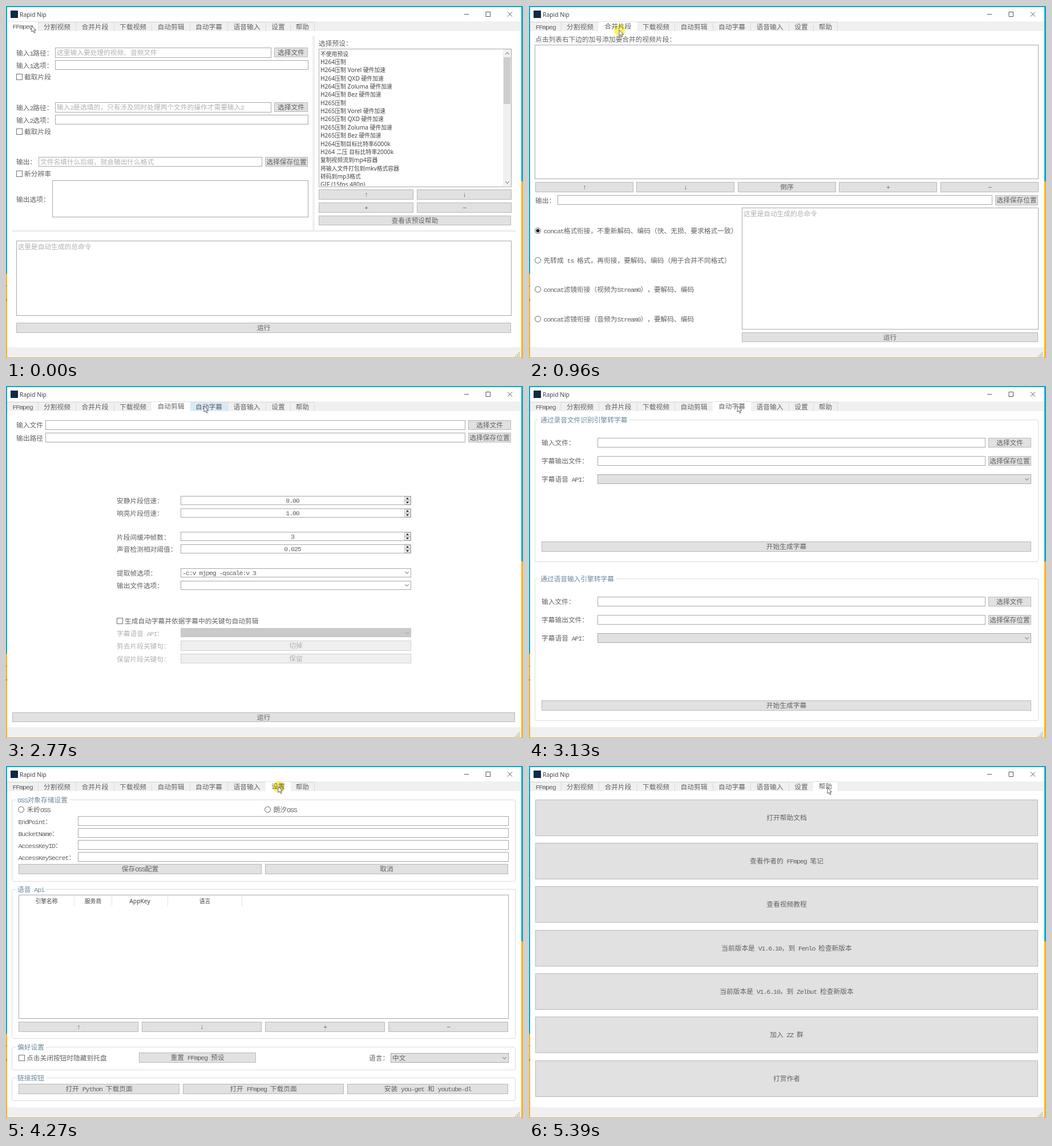
These frames come from a looping animation (906x618 px, 5570 ms). An HTML page:

```html
<!DOCTYPE html>
<html lang="zh-CN">
<head>
<meta charset="utf-8">
<title>Rapid Nip</title>
<style>
html, body { margin: 0; width: 100%; height: 100%; overflow: hidden; background: #fff; }
#stage {
  position: relative; width: 906px; height: 618px; overflow: hidden; background: #fff;
  font: 300 11.73px "Noto Sans CJK SC", "Noto Sans CJK", sans-serif; color: #626262;
  white-space: pre; text-spacing-trim: space-all; font-kerning: none;
}
#stage div, #stage svg { position: absolute; box-sizing: border-box; }
i { font: 1em/1 "Liberation Mono", monospace; letter-spacing: -.1em; }
.lb { line-height: 20px; }
.sans { font-size: 9.8px; color: #444; }
.sans i { font: 1.05em/1 "Noto Sans", sans-serif; letter-spacing: 0; }
.big { font-size: 13.03px; }
.ph { color: #b0b0b0; }
.off { color: #b0b0b0; }
.mid, .bt { text-align: center; }
.in { border: 1px solid #a8a8a8; background: #fff; padding-left: 2px; }
.in.mid { padding: 0; }
.ar { border: 1px solid #a6a8ab; background: #fff; }
.bt { border: 1px solid #b8b8b8; background: #e1e1e1; }
.bt.off { border-color: #d0d0d0; background: #efefef; }
.gray { background: #e1e1e1; }
.dark { background: #cacaca; border-color: #c4c4c4; }
.gr { border: 1px solid #dcdcdc; border-radius: 3px; }
.gt { background: #fff; padding: 0 3px; color: #6a899c; line-height: 14px; }
.ck { border: 1px solid #707070; background: #fff; }
.rd { border: 1px solid #606060; border-radius: 50%; background: #fff; }
.rd.on { background: radial-gradient(#222 0 2.8px, #fff 3.4px); }
.rd.dim { border-color: #c4c4c4; }
.cv { border: solid #808080; border-width: 0 1px 1px 0; transform: rotate(45deg); }
.cv.up { transform: rotate(225deg); }
.cv.dim { border-color: #aaa; }
.sp { border: 1px solid #c4c4c4; background: #f0f0f0; }
.tri { border: solid transparent; border-width: 0 2.5px 3px; border-bottom-color: #333; }
.tri.dn { transform: scaleY(-1); }
.bar { background: #f0f0f0; }
.tab { border: solid #dadada; border-width: 1px 1px 0 0; background: #f0f0f0; text-align: center; }
.tab.hover { background: #d8eaf8; }
.tab.on { background: #fff; border-color: #e2e2e2; }
.clip { overflow: hidden; }
.page { left: 0; top: 0; width: 906px; height: 618px; visibility: hidden; }
#spot { width: 20px; height: 20px; border-radius: 50%; background: #fff04a; opacity: .85; mix-blend-mode: multiply; }
</style>
</head>
<body>
<div id="stage"></div>
<script>
// Half-width runs get their own face
const rich = s => s.replace(/[\x20-\x7e↑↓−]+/g, m => `<i>${m}</i>`);
const raw = (x1, y1, x2, y2, cls, html = '', css = '') =>
  `<div class="${cls}" style="left:${x1}px;top:${y1}px;width:${x2 - x1}px;height:${y2 - y1}px;${css}">${html}</div>`;
const box = (x1, y1, x2, y2, cls, s = '') =>
  raw(x1, y1, x2, y2, cls, rich(s), `line-height:${y2 - y1 - 4}px`);
const label = (x, y, s, cls = '') =>
  `<div class="lb ${cls}" style="left:${x}px;top:${y - 10.5}px">${rich(s)}</div>`;
const labels = (x, ys, names) => names.map((s, i) => label(x, ys[i], s)).join('');
const button = (x1, y1, x2, y2, s, cls = '') => box(x1, y1, x2, y2, 'bt ' + cls, s);
const field = (x1, y1, x2, y2, s = '', cls = '') => box(x1, y1, x2, y2 + 1, 'in ' + cls, s);
const area = (x1, y1, x2, y2) => raw(x1, y1, x2, y2 + 1, 'ar');
const chevron = (x, y, cls = '') => raw(x - 2.5, y - 3.5, x + 2.5, y + 1.5, 'cv ' + cls);
const combo = (x1, y1, x2, y2, s = '', cls = '') =>
  field(x1, y1, x2, y2, s, cls) + chevron(x2 - 8, (y1 + y2) / 2);
const check = (x, y, s) => raw(x, y - 5, x + 11, y + 6, 'ck') + label(x + 14.5, y, s);
const radio = (x, y, s, cls = '') =>
  raw(x - 5.5, y - 5.5, x + 5.5, y + 5.5, 'rd ' + cls) + label(x + 10, y, s, cls === 'dim' ? 'off' : '');
const group = (y1, y2, s) => raw(10, y1, 893, y2, 'gr') +
  `<div class="gt" style="left:17px;top:${y1 - 7}px">${rich(s)}</div>`;
const spin = (y, s) => field(306, y, 710, y + 15) + box(306, y, 698, y + 17, 'mid', s) +
  raw(698, y + 1, 709, y + 8, 'sp') + raw(698, y + 8, 709, y + 15, 'sp') +
  raw(701, y + 3, 706, y + 6, 'tri') + raw(701, y + 10, 706, y + 13, 'tri dn');
const row = (xs, w, y, names) => names.map((s, i) => button(xs[i], y, xs[i] + w, y + 18, s)).join('');

const pick = '选择文件', save = '选择保存位置', run = '运行', total = '这里是自动生成的总命令';
const home = "C:/Users/m'li's";

function mainPage() {
  const presets = ['不使用预设'];
  for (const codec of ['H264', 'H265'])
    for (const hw of ['', ' Vorel 硬件加速', ' QXD 硬件加速', ' Zoluma 硬件加速', ' Bez 硬件加速'])
      presets.push(codec + '压制' + hw);
  presets.push('H264压制目标比特率6000k', 'H264 二压 目标比特率2000k', '复制视频流到mp4容器',
    '将输入文件打包到mkv格式容器', '转码到mp3格式', 'GIF (15fps 480p)');
  const input = (n, y, hint) => label(18, y, `输入${n}路径：`) + field(86, y - 9, 465, y + 8, hint, 'ph') +
    button(470, y - 9, 529, y + 8, pick) + label(18, y + 22, `输入${n}选项：`) +
    field(86, y + 13, 530, y + 29) + check(17.5, y + 42, '截取片段');
  return raw(537, 52, 541, 393, 'bar') + raw(10, 393, 893, 397, 'bar') +
    input(1, 82, '这里输入要处理的视频、音频文件') +
    input(2, 178, '输入2是选填的，只有涉及同时处理两个文件的操作才需要输入2') +
    label(18, 273, '输出：') + field(57, 265, 449, 281, '文件名填什么后缀，就会输出什么格式', 'ph') +
    button(454, 265, 529, 282, save) + check(17.5, 294, '新分辨率') +
    label(18, 339, '输出选项：') + area(81, 306, 530, 370) +
    label(548, 65, '选择预设：') + area(548, 75, 886, 317) +
    raw(549, 76, 871, 316, 'clip', presets.map((s, i) => label(2, 8 + i * 14.37, s, 'sans')).join('')) +
    raw(871, 76, 885, 316, 'bar') + raw(872, 90, 884, 172, '', '', 'background:#cdcdcd') +
    chevron(878, 85, 'up') + chevron(878, 309) +
    row([548, 720], 166, 322, ['↑', '↓']) + row([548, 720], 166, 345, ['+', '−']) +
    button(548, 368, 885, 385, '查看该预设帮助') +
    area(18, 412, 886, 543) + label(20.5, 422, total, 'ph') + button(18, 556, 885, 574, run);
}

function splitPage() {
  const part = (y, h, title, name, value) => group(y, y + h, title) +
    label(22, y + 26, name) + field(120, y + 18, 800, y + 34, value, 'mid') +
    label(22, y + 49, '输出文件夹：') + field(120, y + 41, 800, y + 57) +
    check(22, y + 73, '指定时间段') + label(120, y + 73, '起始时间：') + field(190, y + 65, 440, y + 81) +
    label(460, y + 73, '截止时间：') + field(530, y + 65, 800, y + 81) +
    button(805, y + 18, 880, y + 81, run);
  return label(18, 62, '输入文件：') + field(86, 54, 805, 70) + button(810, 54, 885, 71, pick) +
    part(96, 190, '对字幕中的每一句剪出对应的片段', '输入字幕：', '') +
    label(22, 196, '字幕时间偏移：') + field(120, 188, 440, 204, '0.0', 'mid') +
    check(22, 221, '同时导出分段srt字幕') +
    part(309, 122, '根据指定时长分割片段', '片段时长：', '60') +
    part(454, 134, '根据指定大小分割片段', '片段大小(MB)：', '20');
}

function joinPage() {
  return label(11, 58, '点击列表右下边的加号添加要合并的视频片段：') + area(10, 68, 893, 303) +
    row([11, 188, 366, 543, 721], 172, 309, ['↑', '↓', '倒序', '+', '−']) +
    label(11, 341, '输出：') + field(50, 332, 812, 348) + button(817, 332, 892, 350, save) +
    radio(15.5, 394, 'concat格式衔接，不重新解码、编码（快、无损、要求格式一致）', 'on') +
    radio(15.5, 446, '先转成 ts 格式，再衔接，要解码、编码（用于合并不同格式）') +
    radio(15.5, 497.5, 'concat滤镜衔接（视频为Stream0），要解码、编码') +
    radio(15.5, 549, 'concat滤镜衔接（音频为Stream0），要解码、编码') +
    area(373, 354, 893, 567) + label(376, 364, total, 'ph') + button(373, 573, 892, 590, run);
}

function downloadPage() {
  const best = '不填则默认下载最高画质', blank = '默认不用填';
  const tool = (y, name, proxy) => group(y, y + 165, `使用 ${name} 下载视频`) +
    labels(22, [18, 39, 61, 84, 105].map(d => y + d), ['视频链接：', '保存路径：', '下载格式(流id)：', 'Cookies', '代理：']) +
    field(120, y + 10, 570, y + 26) + check(574.5, y + 18, '下载视频列表') +
    combo(120, y + 31, 800, y + 46, home) +
    field(120, y + 52, 570, y + 68, best, 'ph mid') + button(575, y + 52, 799, y + 69, '列出流id') +
    field(120, y + 75, 570, y + 91, blank, 'ph') + button(575, y + 75, 799, y + 92, pick) +
    combo(120, y + 97, 800, y + 112, proxy) + button(805, y + 11, 880, y + 112, '开始下载视频');
  return tool(59, 'Annie', '') + tool(241, 'You-Get', '--no-proxy') +
    group(424, 589, '使用 Youtube-dl 下载视频') +
    labels(22, [442, 463, 484, 505, 528, 550], ['视频链接：', '保存路径：', '文件命名格式：', '格式id：', 'Cookies', '代理：']) +
    field(108, 434, 566, 450) + check(570.5, 442, '只下载字幕') +
    combo(108, 455, 800, 470, home + '/Videos') +
    field(108, 476, 800, 491, '%(title)s from：%(uploader)s %(resolution)s %(fps)s fps %(id)s.%(ext)s') +
    field(108, 497, 566, 513, best, 'ph mid') + button(571, 497, 799, 514, '列出格式id') +
    field(108, 519, 566, 535, blank, 'ph') + button(571, 519, 799, 537, pick) +
    combo(108, 542, 800, 557) + button(805, 434, 880, 557, '开始下载视频');
}

function cutPage() {
  return labels(18, [68, 91], ['输入文件', '输出路径']) +
    field(69, 60, 805, 76) + button(810, 60, 885, 77, pick) +
    field(69, 82, 805, 98) + button(810, 82, 885, 99, save) +
    labels(194, [201, 223, 265, 286, 328, 350],
      ['安静片段倍速：', '响亮片段倍速：', '片段间缓冲帧数：', '声音检测相对阈值：', '提取帧选项：', '输出文件选项：']) +
    spin(193, '8.00') + spin(215, '1.00') + spin(256, '3') + spin(278, '0.025') +
    combo(306, 320, 710, 335, '-c:v mjpeg -qscale:v 3') + combo(306, 342, 710, 357) +
    check(193.5, 412, '生成自动字幕并依据字幕中的关键句自动剪辑') +
    label(194, 434, '字幕语音 API：', 'off') + field(306, 425, 710, 440, '', 'dark') + chevron(702, 433, 'dim') +
    label(194, 456, '剪去片段关键句：', 'off') + button(306, 447, 710, 465, '切掉', 'off') +
    label(194, 479, '保留片段关键句：', 'off') + button(306, 470, 710, 487, '保留', 'off') +
    button(11, 573, 892, 590, run);
}

function subtitlePage() {
  const engine = (y, title) => group(y, y + 250, title) +
    labels(22, [40, 72, 104].map(d => y + d), ['输入文件：', '字幕输出文件：', '字幕语音 API：']) +
    field(120, y + 32, 800, y + 48) + button(805, y + 32, 880, y + 49, pick) +
    field(120, y + 64, 800, y + 80) + button(805, y + 64, 880, y + 81, save) +
    combo(120, y + 96, 880, y + 112, '', 'gray') +
    button(22, y + 214, 880, y + 232, '开始生成字幕');
  return engine(59, '通过录音文件识别引擎转字幕') + engine(338, '通过语音输入引擎转字幕');
}

function voicePage() {
  return label(11, 60, '字幕语音 API：') + combo(97, 51, 893, 67, '', 'gray') +
    radio(15.5, 99, '停用 CapsWirter 语音输入', 'on') + radio(459, 99, '启用 CapsWirter 语音输入', 'dim') +
    area(10, 130, 893, 275) + area(10, 300, 893, 444) +
    label(13.5, 140.5, '选择禾岭云 api 的引擎，启用 CapsWriter 语音输入后，只要在任意界面长按大写大写锁定键（Caps Lk）超过 0.3 秒，就会开始进行语音识别，说几', 'big') +
    label(13.5, 155, '句话，再松开大写锁定键，请别结果就会自动输入。你可以在这个输入框试试效果', 'big');
}

function settingsPage() {
  const keys = ['EndPoint：', 'BucketName：', 'AccessKeyID：', 'AccessKeySecret：'];
  const head = (x1, x2, s) => box(x1, 228, x2, 250, 'mid sans', s) + raw(x2, 228, x2 + 1, 246, '', '', 'background:#e2e2e2');
  return group(59, 203, 'OSS对象存储设置') + radio(26.5, 76, '禾岭OSS') + radio(458.5, 76, '朗汐OSS') +
    keys.map((s, i) => label(21.5, 97 + i * 21, s) + field(126, 88 + i * 21, 881, 104 + i * 21)).join('') +
    row([22, 454], 426, 172, ['保存OSS配置', '取消']) +
    group(216, 479, '语音 Api') + area(22, 226, 881, 443) +
    head(23, 119, '引擎名称') + head(120, 185, '服务商') + head(186, 283, 'AppKey') + head(284, 413, '语言') +
    row([22, 238, 454, 670], 210, 449, ['↑', '↓', '+', '−']) +
    group(493, 534, '偏好设置') + check(21.5, 512, '点击关闭按钮时隐藏到托盘') +
    button(233, 503, 438, 521, '重置 FFmpeg 预设') + label(636, 512, '语言：') +
    combo(674, 504, 881, 520, '中文', 'gray') +
    group(547, 588, '链接按钮') +
    row([22, 310, 598], 282, 558, ['打开 Python 下载页面', '打开 FFmpeg 下载页面', '安装 you-get 和 youtube-dl']);
}

function helpPage() {
  return ['打开帮助文档', '查看作者的 FFmpeg 笔记', '查看视频教程', '当前版本是 V1.6.10，到 Fenlo 检查新版本',
    '当前版本是 V1.6.10，到 Zelbut 检查新版本', '加入 ZZ 群', '打赏作者']
    .map((s, i) => { const y = Math.round(58.7 + i * 76.35); return button(11, y, 892, y + 64, s); }).join('');
}

const pages = [mainPage, splitPage, joinPage, downloadPage, cutPage, subtitlePage, voicePage, settingsPage, helpPage];
const names = ['FFmpeg', '分割视频', '合并片段', '下载视频', '自动剪辑', '自动字幕', '语音输入', '设置', '帮助'];
const edges = [2, 57, 123, 190, 256, 323, 389, 456, 499, 541];
const cyan = 'background:#0aaacb', orange = 'background:#fdb218', brown = 'background:#a87410';

stage.innerHTML =
  raw(0, 0, 906, 2, '', '', cyan) + raw(0, 0, 2, 470, '', '', cyan) + raw(0, 470, 2, 618, '', '', orange) +
  raw(0, 491, 2, 492, '', '', brown) + raw(0, 515, 2, 517, '', '', brown) +
  raw(903, 0, 906, 308, '', '', cyan) + raw(903, 308, 906, 618, '', '', orange) +
  raw(2, 27, 903, 44, 'bar') + raw(2, 599, 903, 617, 'bar') + raw(2, 617, 903, 618, '', '', 'background:#d9ad55') +
  raw(8, 8, 21, 21, '', '', 'background:#0c2a48') + label(24, 15, 'Rapid Nip', 'sans') +
  `<svg width="906" height="618" fill="none" stroke="#555">
    <path d="M803 14.5h8M841 10.5h7.5v8h-7.5zM879 10.5l8 8m0-8l-8 8"/>
    <path stroke="#b8b8b8" stroke-width="2" stroke-dasharray="2 1" d="M899 608v8M896 611v5M893 614v2"/></svg>` +
  names.map((s, i) => box(edges[i], 28, edges[i + 1], 45, 'tab', s)).join('') +
  pages.map(p => `<div class="page">${p()}</div>`).join('') +
  `<div id="spot"></div><svg id="arrow" width="12" height="16" overflow="visible" style="left:0;top:0">
    <path d="M0 0V10.5L2.5 8.3 4.4 12.4 6.2 11.6 4.4 7.7H7.6Z" fill="#fff" stroke="#4a4a58" stroke-width=".9"/></svg>`;

const tabs = [...document.querySelectorAll('.tab')];
const sheets = [...document.querySelectorAll('.page')];
const LOOP = 5570, START = [45, 35];
// Pointer moves: first step, last step, number of steps, x, y
const moves = [
  [80, 80, 1, 88, 36], [460, 860, 5, 158, 42], [1240, 1540, 4, 216, 37], [1830, 2020, 3, 281, 31],
  [2500, 2770, 4, 347, 35], [3130, 3310, 3, 417, 36], [3880, 4070, 3, 477, 36],
  [4620, 4810, 3, 522, 37], [5390, 5390, 1, 523, 38]
];
const opened = [0, 280, 960, 1640, 2200, 2850, 3510, 4270, 4990];
const clicks = [[960, 1040], [1640, 1740], [2200, 2300], [2850, 2950], [4270, 4340], [4990, 5070]];

function pointer(t) {
  let [x, y] = START;
  for (const [a, b, n, tx, ty] of moves) {
    if (t < a) break;
    const k = b > a ? Math.min(n, Math.floor((t - a) / (b - a) * (n - 1) + 1e-6) + 1) / n : 1;
    const e = k * k * (3 - 2 * k);
    x += (tx - x) * e;
    y += (ty - y) * e;
  }
  return [x, y];
}

function draw(t) {
  const [x, y] = pointer(t);
  const cur = opened.filter(s => s <= t).length - 1;
  tabs.forEach((tab, i) => {
    const on = i === cur, grow = on && i ? 1 : 0;
    tab.className = 'tab' + (on ? ' on' : x >= edges[i] && x < edges[i + 1] ? ' hover' : '');
    tab.style.left = edges[i] - grow + 'px';
    tab.style.width = edges[i + 1] - edges[i] + 2 * grow + 'px';
    tab.style.top = (on ? 27 : 28) + 'px';
    tab.style.height = (on ? 17 : 16) + 'px';
    sheets[i].style.visibility = on ? 'visible' : 'hidden';
  });
  arrow.style.transform = `translate(${x}px, ${y}px)`;
  spot.style.left = x - 9.5 + 'px';
  spot.style.top = y - 9 + 'px';
  spot.style.visibility = clicks.some(([a, b]) => t >= a && t < b) ? 'visible' : 'hidden';
}

const start = performance.now();
function tick() {
  draw((performance.now() - start) % LOOP);
  requestAnimationFrame(tick);
}
tick();
</script>
</body>
</html>
```
